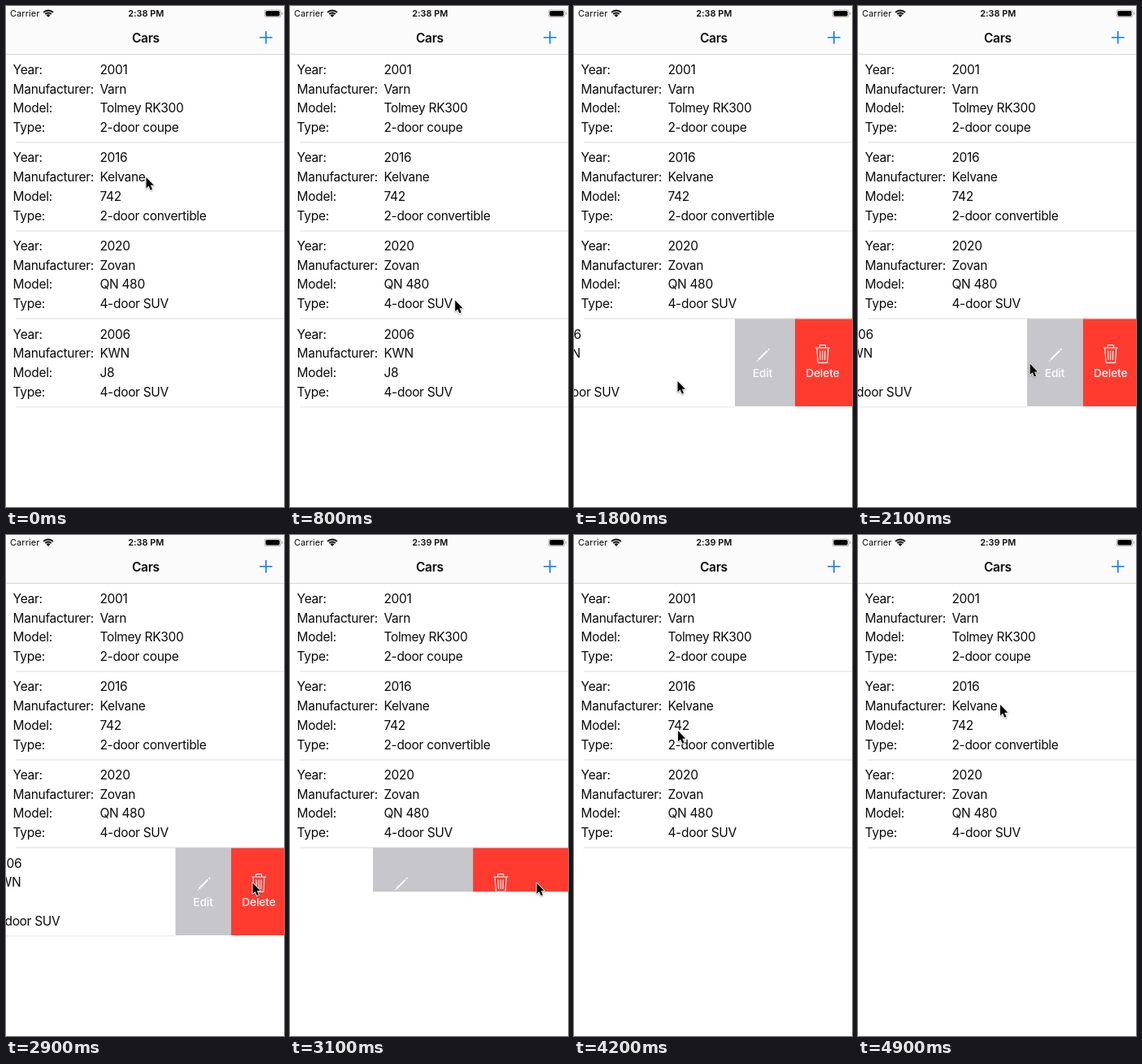
These frames come from a looping animation (342x617 px, 5200 ms). An HTML page with a canvas:

```html
<!DOCTYPE html>
<html lang="en">
<head>
<meta charset="utf-8">
<title>Cars</title>
<style>
html, body { margin: 0; width: 100%; height: 100%; overflow: hidden; background: #fff; }
canvas { display: block; width: 342px; height: 617px; }
</style>
</head>
<body>
<canvas id="stage"></canvas>
<script>
const W = 342, H = 617, LOOP = 5200, STEP = 100;
const ROW_TOP = 59.6, ROW_H = 108.6, LINE_H = 23.7;
const INK = '#0a0a0a', FONT = 'Inter, Roboto, sans-serif';
const SWIPE_AT = 1500, OPEN = 133.5, DELETE_AT = 3100, GONE_AT = 3200;
const LABELS = ['Year:', 'Manufacturer:', 'Model:', 'Type:'];
const CARS = [
  ['2001', 'Varn', 'Tolmey RK300', '2-door coupe'],
  ['2016', 'Kelvane', '742', '2-door convertible'],
  ['2020', 'Zovan', 'QN 480', '4-door SUV'],
  ['2006', 'KWN', 'J8', '4-door SUV']
];

// Pointer strokes: start and end time, bend point, end point
const HOME = [172.5, 211];
const MOVES = [
  { from: 0, to: 600, bend: [93, 58], end: [163, 276] },
  { from: 600, to: 1200, bend: [190, 360], end: [250, 422] },
  { from: 1200, to: 1500, bend: [190, 435], end: [97, 443] },
  { from: 1500, to: 1800, bend: [97, 458], end: [127.5, 462] },
  { from: 1800, to: 2900, bend: [218, 434], end: [303.5, 428.5] },
  { from: 3600, to: 4200, bend: [235, 403], end: [128, 241] },
  { from: 4200, to: 4500, bend: [205, 200], end: [175, 209] }
];

const canvas = document.getElementById('stage');
const ctx = canvas.getContext('2d');
const dpr = window.devicePixelRatio || 1;
canvas.width = W * dpr;
canvas.height = H * dpr;

const easeOut = u => 1 - (1 - u) ** 2;
const bezier = (a, b, c, s) => a * (1 - s) ** 2 + 2 * b * s * (1 - s) + c * s * s;

function pointerAt(t) {
  let pos = HOME;
  for (const { from, to, bend, end } of MOVES) {
    if (t <= from) break;
    const s = easeOut(Math.min(1, (t - from) / (to - from)));
    pos = pos.map((p, i) => bezier(p, bend[i], end[i], s));
  }
  return pos;
}

// Damped spring that settles at the open position
function swipeAt(t) {
  const u = Math.max(0, t - SWIPE_AT);
  return OPEN * (1 - Math.exp(-u / 145) * Math.cos(u * 0.0075));
}

function text(str, x, y, { size = 15.5, weight = 400, color = INK, align = 'left', gap = -0.3 } = {}) {
  ctx.font = `${weight} ${size}px ${FONT}`;
  ctx.letterSpacing = gap + 'px';
  ctx.textAlign = align;
  ctx.fillStyle = color;
  ctx.fillText(str, x, y);
}

function rect(x, y, w, h, color) {
  ctx.fillStyle = color;
  ctx.fillRect(x, y, w, h);
}

function roundRect(x, y, w, h, r, color) {
  ctx.fillStyle = color;
  ctx.beginPath();
  ctx.roundRect(x, y, w, h, r);
  ctx.fill();
}

function stroke(d, color, width) {
  ctx.strokeStyle = color;
  ctx.lineWidth = width;
  ctx.stroke(new Path2D(d));
}

function wifi(x, y) {
  ctx.strokeStyle = INK;
  for (const [r, width] of [[1.7, 3.4], [5.3, 2], [8.4, 2]]) {
    ctx.lineWidth = width;
    ctx.beginPath();
    ctx.arc(x, y, r, Math.PI * 1.25, Math.PI * 1.75);
    ctx.stroke();
  }
}

function battery() {
  roundRect(317.8, 4.4, 20.4, 9.6, 2.8, '#a8a8a8');
  roundRect(318.6, 5.2, 18.8, 8, 2.2, '#fbfbfb');
  roundRect(319.4, 6, 17.2, 6.4, 1.6, '#000');
  roundRect(339, 7.6, 1.2, 3.2, 0.6, '#a8a8a8');
}

function navBar(t) {
  rect(0, 0, W, 59, '#fbfbfb');
  rect(0, 59, W, 1, '#d6d6d6');
  text('Carrier', 5, 13.3, { size: 10.9, gap: 0.1 });
  text(t < DELETE_AT ? '2:38 PM' : '2:39 PM', 172.3, 13.3, { size: 10.9, weight: 600, align: 'center', gap: 0.05 });
  wifi(52, 13.8);
  battery();
  text('Cars', 171.8, 44.5, { weight: 600, align: 'center' });
  stroke('M312 38.8H327.6M319.8 31V46.6', '#0a7aff', 1.6);
}

function row(i, shift = 0) {
  const top = ROW_TOP + i * ROW_H;
  LABELS.forEach((label, k) => {
    const y = top + 24.2 + k * LINE_H;
    text(label, 8.6 - shift, y);
    text(CARS[i][k], 115.4 - shift, y);
  });
  rect(12 - shift, Math.round(top + ROW_H) - 0.5, W - 12, 1, '#dcdcdc');
}

function caption(str, x) {
  text(str, x, 456.6, { size: 13.7, weight: 500, color: '#fff', align: 'center', gap: -0.1 });
}

function pencil(x) {
  stroke(`M${x - 5} 435.5L${x + 6} 424.5M${x + 7} 423.5L${x + 8.3} 422.2`, '#fff', 1.9);
  stroke(`M${x - 7.2} 437.8L${x - 5} 435.5`, '#fff', 1);
}

function trash(x) {
  const lid = `M${x - 9} 421H${x + 9}M${x - 3.5} 421V417.6H${x + 3.5}V421`;
  const can = `M${x - 7} 421L${x - 5.8} 439.4H${x + 5.8}L${x + 7} 421`;
  const ribs = [-1, 0, 1].map(k => `M${x + 3.1 * k} 424.5L${x + 2.7 * k} 436`).join('');
  ctx.lineJoin = 'round';
  stroke(lid + can + ribs, '#fff', 1.1);
}

function actions(shift) {
  const left = W - shift, mid = left + shift * 0.513;
  const top = 385, h = 108;
  rect(left, top, mid - left, h, '#c6c6cb');
  pencil(left + 34);
  caption('Edit', left + 34);
  rect(mid, top, W - mid, h, '#ff3b30');
  trash(mid + 34);
  caption('Delete', mid + 34);
}

function lastRow(t) {
  if (t >= GONE_AT) return;
  const leaving = t >= DELETE_AT;
  const shift = leaving ? 240 : swipeAt(t);
  ctx.save();
  ctx.beginPath();
  ctx.rect(0, 385, W, leaving ? ROW_H / 2 : ROW_H + 1);
  ctx.clip();
  row(3, shift);
  if (shift > 0) actions(shift);
  ctx.restore();
}

function pointer([x, y]) {
  const arrow = new Path2D('M0 0V13.4L3 10.6L5.3 15.8L7.5 14.8L5.3 9.8H9.4Z');
  ctx.save();
  ctx.translate(x, y);
  ctx.lineJoin = 'round';
  ctx.lineWidth = 1.8;
  ctx.strokeStyle = '#fff';
  ctx.shadowColor = 'rgba(0, 0, 0, 0.4)';
  ctx.shadowBlur = 2 * dpr;
  ctx.shadowOffsetY = 0.6 * dpr;
  ctx.stroke(arrow);
  ctx.shadowColor = 'transparent';
  ctx.fillStyle = '#000';
  ctx.fill(arrow);
  ctx.restore();
}

function draw(now) {
  const t = Math.floor((now % LOOP) / STEP) * STEP;
  ctx.setTransform(dpr, 0, 0, dpr, 0, 0);
  rect(0, 0, W, H, '#fff');
  navBar(t);
  lastRow(t);
  for (let i = 0; i < 3; i++) row(i);
  pointer(pointerAt(t));
}

const start = performance.now();
function loop() {
  draw(performance.now() - start);
  requestAnimationFrame(loop);
}
loop();
</script>
</body>
</html>
```
